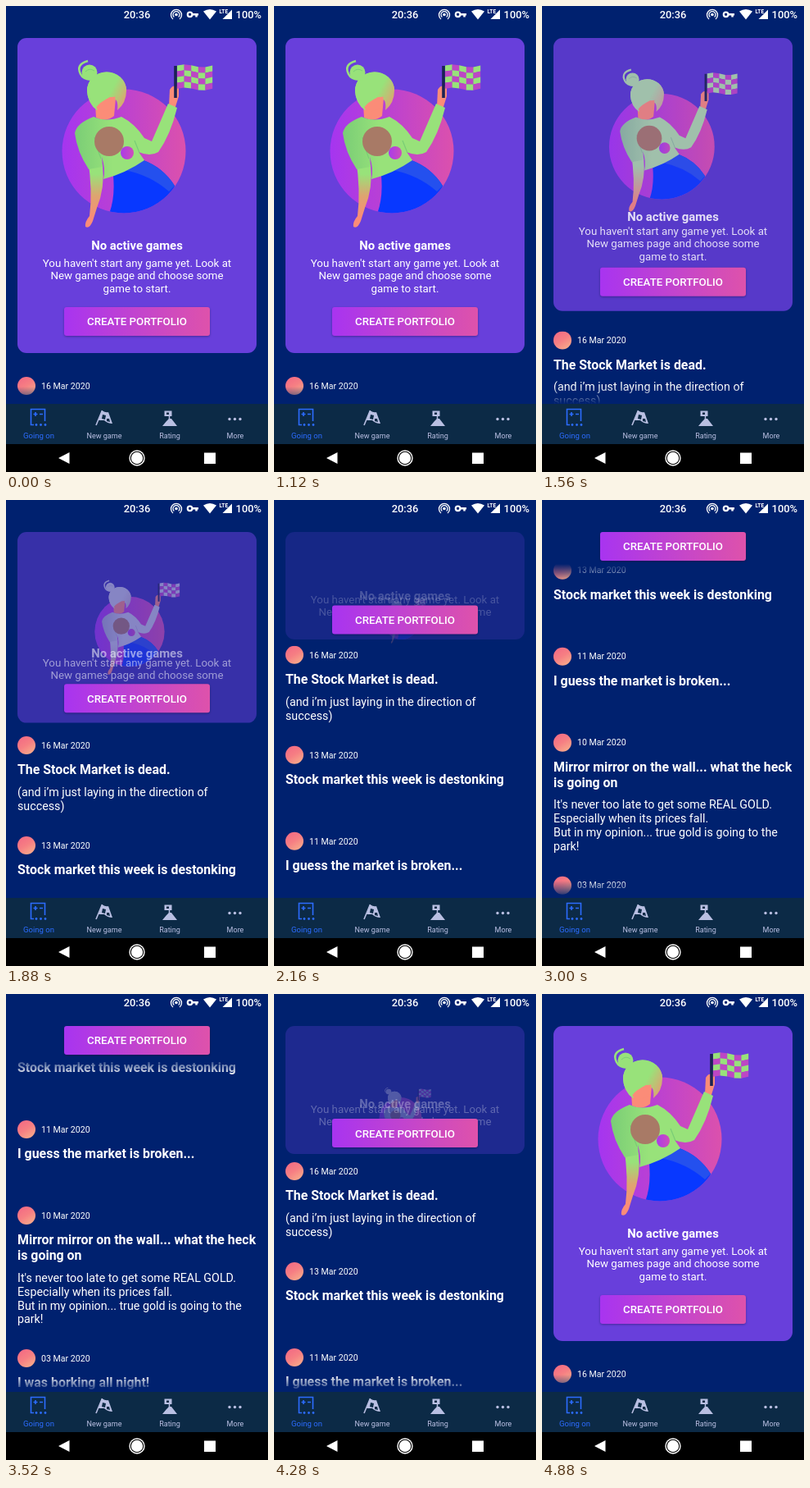
An HTML page with a canvas for the animation above (6.04 s loop, 320 by 568 pixels).

```html
<!DOCTYPE html>
<html lang="en">
<head>
<meta charset="utf-8">
<title>Portfolio feed</title>
<style>
  html, body { margin: 0; width: 100%; height: 100%; overflow: hidden; background: #00216f; }
  canvas { display: block; width: 100%; height: 100%; }
</style>
</head>
<body>
<canvas id="stage" width="320" height="568"></canvas>
<script>
const W = 320, H = 568, LOOP = 6040, STEP = 40;
const BG = '#00216f', LIST_BOTTOM = 485, LIST_TOP = 78, FADE = 21, COLLAPSE = 377;
const ctx = document.getElementById('stage').getContext('2d');
const layer = document.createElement('canvas');
layer.width = W;
layer.height = H;
const art = layer.getContext('2d');

// Scroll keys: time, offset, velocity in px/ms
const scrollKeys = [
  [1240, 0, 0.05], [1880, 164, 0.38], [2520, 403, 0.3], [3520, 525, 0],
  [3720, 525, 0], [4280, 247, -0.95], [4560, 0, -0.5]
];

const posts = [
  { y: 0, date: '16 Mar 2020', title: ['The Stock Market is dead.'],
    body: ['(and i’m just laying in the direction of', 'success)'] },
  { y: 122, date: '13 Mar 2020', title: ['Stock market this week is destonking'], body: [] },
  { y: 227, date: '11 Mar 2020', title: ['I guess the market is broken...'], body: [] },
  { y: 332, date: '10 Mar 2020',
    title: ['Mirror mirror on the wall... what the heck', 'is going on'],
    body: ["It's never too late to get some REAL GOLD.", 'Especially when its prices fall.',
           'But in my opinion... true gold is going to the', 'park!'] },
  { y: 506, date: '03 Mar 2020', title: ['I was borking all night!'], body: [] }
];

const clamp = v => Math.max(0, Math.min(1, v));
const mix = (a, b, k) => `rgb(${a.map((v, i) => Math.round(v + (b[i] - v) * k))})`;

function scrollAt(t) {
  const i = scrollKeys.findIndex(key => key[0] > t);
  if (i <= 0) return 0;
  const [t0, s0, v0] = scrollKeys[i - 1], [t1, s1, v1] = scrollKeys[i];
  const d = t1 - t0, u = (t - t0) / d, w = 1 - u;
  return s0 * w * w * (1 + 2 * u) + s1 * u * u * (3 - 2 * u) + d * u * w * (v0 * w - v1 * u);
}

function gradient(c, x0, y0, x1, y1, ...colors) {
  const g = c.createLinearGradient(x0, y0, x1, y1);
  colors.forEach((color, i) => g.addColorStop(i / (colors.length - 1), color));
  return g;
}

function text(str, x, y, size, weight = 400, color = '#fff', align = 'left') {
  ctx.font = `${weight} ${size}px Roboto, sans-serif`;
  ctx.textAlign = align;
  ctx.fillStyle = color;
  ctx.fillText(str, x, y + size * 0.355);
}

function shape(c, d, color) {
  c.fillStyle = color;
  c.fill(new Path2D(d));
}

function line(c, d, color, width) {
  c.strokeStyle = color;
  c.lineWidth = width;
  c.stroke(new Path2D(d));
}

function disc(c, x, y, r, color) {
  c.fillStyle = color;
  c.beginPath();
  c.arc(x, y, r, 0, Math.PI * 2);
  c.fill();
}

function box(x, y, w, h, r, color) {
  ctx.fillStyle = color;
  ctx.beginPath();
  ctx.roundRect(x, y, w, h, r);
  ctx.fill();
}

function drawFlag(green) {
  const wave = c => 1.8 * Math.sin(c * 1.25 + 3.4);
  for (let col = 0; col < 5; col++) {
    for (let row = 0; row < 4; row++) {
      const x = 209 + col * 8.6, y = 73 + row * 7;
      art.fillStyle = (col + row) % 2 ? '#bd46c4' : green;
      art.beginPath();
      art.moveTo(x, y + wave(col));
      art.lineTo(x + 8.8, y + wave(col + 1));
      art.lineTo(x + 8.8, y + 7.2 + wave(col + 1));
      art.lineTo(x, y + 7.2 + wave(col));
      art.fill();
    }
  }
}

function drawWoman(p) {
  const tint = clamp(p * 3), scale = 1 - p;
  const green = mix([152, 226, 122], [205, 208, 222], tint);
  const shade = mix([122, 205, 118], [172, 176, 200], tint);
  const tan = mix([222, 164, 112], [196, 186, 200], tint);
  const skin = '#fb8c78';
  art.setTransform(1, 0, 0, 1, 0, 0);
  art.clearRect(0, 0, W, H);
  art.setTransform(scale, 0, 0, scale, 160 - 160 * scale, 167 - 28 * p - 167 * scale);

  disc(art, 144, 177, 75.5, gradient(art, 68, 0, 220, 0, '#a535f0', '#bd42cf', '#dc51ac'));

  art.save();
  art.beginPath();
  art.arc(144, 177, 75.5, 0, 7);
  art.clip();
  shape(art, 'M131 207L168 188Q192 197 206 219L202 262H122Q134 240 131 207Z', '#0838ff');
  shape(art, 'M145 200L168 188Q192 197 206 219L199 226Q176 206 145 200Z', '#2450ee');
  art.restore();

  // Left arm with long sleeve, neck
  shape(art, 'M100 186L118 194Q121 222 111 246L106 262Q102 272 97 269Q96 263 102 256Q106 225 100 186Z',
    gradient(art, 0, 205, 0, 258, green, tan, skin));
  shape(art, 'M109 119L134 112L132 134Q122 142 110 136Z', skin);
  // Hand on the pole
  shape(art, 'M199 122L200 102Q204 95 211 99L211 110L206 126Z', skin);
  line(art, 'M207 73V112', '#1b2252', 3.6);
  // Sweater with raised right sleeve
  shape(art, 'M107 135Q122 142 141 135Q157 143 169 161L178 165L198 119L209 124Q201 157 186 178Q176 184 162 178L169 188Q146 204 119 211Q122 199 117 184L118 196L101 199Q87 178 84 155Q86 143 107 135Z',
    gradient(art, 84, 0, 130, 0, shade, green));
  line(art, 'M116 186Q111 174 108 160M163 179L157 164', shade, 1.2);
  disc(art, 126, 165, 18, '#a87a66');
  disc(art, 148, 179, 8, gradient(art, 140, 0, 156, 0, '#a93bea', '#cf4dba'));

  // Hair with bun
  const hair = gradient(art, 108, 96, 146, 116, green, green, tan);
  shape(art, 'M99 104A24 23 0 0 1 147 103Q147 118 136 127Q138 111 128 113Q116 117 111 127Q100 119 99 104Z', hair);
  shape(art, 'M108 121Q110 108 134 108L132 122Q120 132 112 126Z', skin);
  shape(art, 'M99 103A24 22 0 0 1 147 102Q140 112 127 111Q113 118 110 124Q99 116 99 103Z', hair);
  disc(art, 102, 81, 9.5, green);
  line(art, 'M100 67Q85 71 91 83Q95 91 108 89', green, 2.6);
  line(art, 'M97 80Q102 75 108 79', shade, 1);
  drawFlag(green);
}

function drawPosts(scroll) {
  const top = Math.max(LIST_TOP, 452 - scroll);
  ctx.save();
  ctx.beginPath();
  ctx.rect(0, top, W, LIST_BOTTOM - top);
  ctx.clip();
  for (const post of posts) {
    const y = 463 - scroll + post.y;
    if (y > 510 || y < -90) continue;
    disc(ctx, 25, y, 11, gradient(ctx, 18, y - 10, 31, y + 10, '#f36b84', '#f67f83', '#f8a98a'));
    text(post.date, 43, y, 10.6);
    post.title.forEach((s, i) => text(s, 14, y + 29.5 + i * 18.7, 15.92, 700));
    const bodyY = y + 57 + (post.title.length - 1) * 18.7;
    post.body.forEach((s, i) => text(s, 14, bodyY + i * 16.9, 14.27));
  }
  const clear = 'rgba(0,33,111,0)';
  const fade = Math.min(FADE, scroll - COLLAPSE);
  if (fade > 0) {
    ctx.fillStyle = gradient(ctx, 0, LIST_TOP, 0, LIST_TOP + fade, BG, clear);
    ctx.fillRect(0, LIST_TOP, W, fade);
  }
  ctx.fillStyle = gradient(ctx, 0, LIST_BOTTOM - FADE, 0, LIST_BOTTOM, clear, BG);
  ctx.fillRect(0, LIST_BOTTOM - FADE, W, FADE);
  ctx.restore();
}

function drawHeader(p) {
  const alpha = clamp(1 - 1.08 * p);
  if (alpha > 0) {
    ctx.globalAlpha = alpha;
    box(14, 39, 292, 384 - 348 * p, 11, '#683fdb');
    drawWoman(p);
    ctx.drawImage(layer, 0, 0);
    text('No active games', 160, 292 - 241.5 * p, 14.9, 700, '#fff', 'center');
    ["You haven't start any game yet. Look at", 'New games page and choose some', 'game to start.']
      .forEach((s, i) => text(s, 160, 313 - 264 * p + i * 15.6, 13.3, 400, '#fff', 'center'));
    ctx.globalAlpha = 1;
  }
  const y = 367 - 328 * p;
  ctx.save();
  ctx.shadowColor = 'rgba(0,0,30,.35)';
  ctx.shadowBlur = 3;
  ctx.shadowOffsetY = 1;
  box(71, y, 178, 35, 3, gradient(ctx, 71, 0, 249, 0, '#a834f0', '#c244ce', '#de52ab'));
  ctx.restore();
  text('CREATE PORTFOLIO', 160, y + 17.7, 13.3, 500, '#fff', 'center');
}

function drawStatusBar() {
  const white = '#fff';
  text('20:36', 160, 10.5, 12.9, 500, white, 'center');
  text('100%', 312, 10.5, 12.9, 500, white, 'right');
  disc(ctx, 208, 10.5, 1.8, white);
  line(ctx, 'M205.3 13.6A4 4 0 1 1 210.7 13.6M204 16A6.5 6.5 0 1 1 212 16', white, 1.3);
  line(ctx, 'M227.4 10.3A2.8 2.8 0 1 1 221.8 10.3A2.8 2.8 0 1 1 227.4 10.3', white, 2.2);
  line(ctx, 'M227 10.3H235M232.5 10V13.5', white, 2.5);
  shape(ctx, 'M241 6.5Q249 1.5 257 6.5L249 16.5Z', white);
  text('LTE', 260.5, 6.5, 6.5, 700);
  shape(ctx, 'M276 4.5V16H264.5Z', white);
}

function drawNavigation() {
  const blue = '#2c6cff', pale = '#b9bfe2', bar = '#0c2a46';
  ctx.fillStyle = bar;
  ctx.fillRect(0, LIST_BOTTOM, W, 534 - LIST_BOTTOM);

  line(ctx, 'M34 510.5H30.5V491.5H47.5V506M33.5 497.5H38.5M36 495V500M41 497.5H45', blue, 1.6);
  [37, 42.5, 48].forEach(x => disc(ctx, x, 510.5, 1.4, blue));

  line(ctx, 'M117.5 493L110 511', pale, 1.6);
  shape(ctx, 'M117 493Q122 496 125 495L130 509Q124 509 120 505L113 505Z', pale);
  shape(ctx, 'M118 498L122 499L121 504L117 503ZM123 503L126 503L127 507L123 506Z', bar);

  line(ctx, 'M199.5 494V505', pale, 1.5);
  shape(ctx, 'M193.5 493.5H202.5V500H193.5ZM191 512L196 506L199 503H202L209 512Z', pale);
  shape(ctx, 'M196 495.5H199V498H196Z', bar);

  [273, 279.5, 286].forEach(x => disc(ctx, x, 503.5, 1.7, pale));

  text('Going on', 40, 523.5, 9.6, 400, blue, 'center');
  text('New game', 120, 523.5, 9.05, 400, pale, 'center');
  text('Rating', 200, 523.5, 9.05, 400, pale, 'center');
  text('More', 280, 523.5, 9.05, 400, pale, 'center');

  ctx.fillStyle = '#000';
  ctx.fillRect(0, 534, W, 34);
  shape(ctx, 'M64 551L77.5 544V558ZM242 544.5H256V558H242Z', '#fff');
  disc(ctx, 160, 551, 9.7, '#fff');
  disc(ctx, 160, 551, 8.3, '#000');
  disc(ctx, 160, 551, 7.2, '#fff');
}

function draw(t) {
  const scroll = scrollAt(t);
  ctx.fillStyle = BG;
  ctx.fillRect(0, 0, W, H);
  drawPosts(scroll);
  drawHeader(clamp(scroll / COLLAPSE));
  drawStatusBar();
  drawNavigation();
}

const start = performance.now();
function tick() {
  const t = (performance.now() - start) % LOOP;
  draw(Math.floor(t / STEP) * STEP);
  requestAnimationFrame(tick);
}
tick();
</script>
</body>
</html>
```
